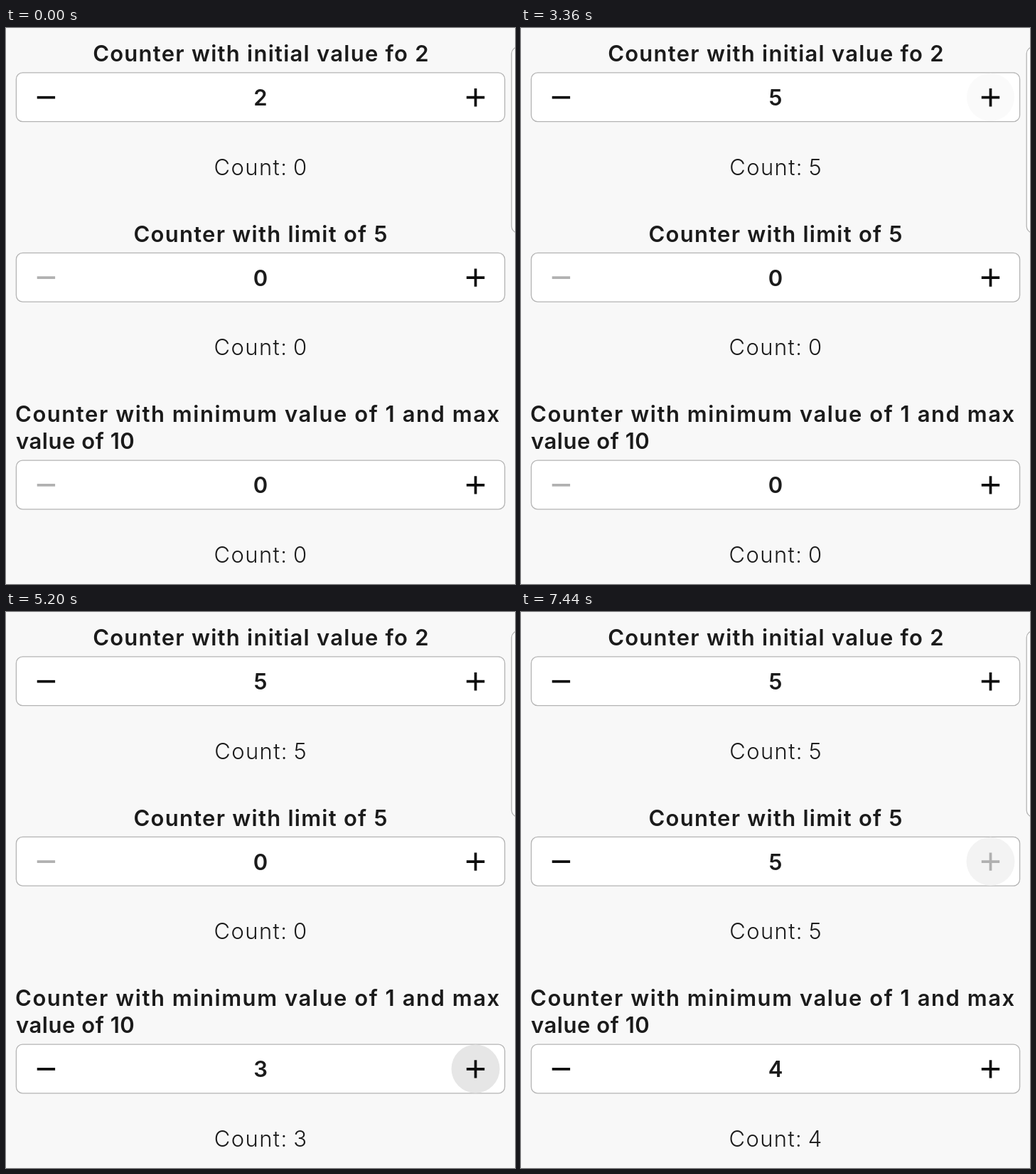
Animation, 716 px wide and 782 px high, one loop 8000 ms. Source, as an HTML page:

```html
<!DOCTYPE html>
<html lang="en">
<head>
<meta charset="utf-8">
<title>Counters</title>
<style>
  html, body { margin: 0; width: 100%; height: 100%; overflow: hidden; background: #f8f8f8; }
  svg { display: block; width: 716px; height: 782px; }
  text { font-family: Inter, "Open Sans", sans-serif; font-size: 31px; fill: #1b1b1b; }
  .title, .value { font-weight: 600; }
  .title { letter-spacing: 1.25px; }
  .wide { letter-spacing: 1.55px; }
  .tight { letter-spacing: .55px; }
  .count { font-weight: 300; letter-spacing: 1.4px; word-spacing: -2.5px; }
  .mid { text-anchor: middle; }
  .box { fill: #fff; stroke: #b4b4b4; stroke-width: 1.3; }
  .sign { stroke: #0c0c0c; stroke-width: 3.7; fill: none; }
  .sign.off { stroke: #b0b0b0; }
</style>
</head>
<body>
<svg viewBox="0 0 716 782">
  <rect class="box" x="711.2" y="27" width="40" height="261" rx="9"/>
  <text class="title mid" x="359" y="47">Counter with initial value fo 2</text>
  <text class="title mid" x="358.6" y="300.5">Counter with limit of 5</text>
  <text class="title wide" x="13" y="554">Counter with minimum value of 1 and max</text>
  <text class="title tight" x="14" y="592">value of 10</text>
  <g id="rows"></g>
</svg>
<script>
const LOOP = 8000;
const ROWS = [
  { y: 97.3, start: 2, min: 0, max: Infinity },
  { y: 350.7, start: 0, min: 0, max: 5 },
  { y: 642.5, start: 0, min: 1, max: 10 }
];
const NONE = [0, '#fff'], SMALL = [26, '#e8e8e8'], FULL = [34, '#e6e6e6'],
      SOFT = [34, '#f3f3f3'], FAINT = [33.5, '#fafafa'];

// time, row, value, ripple
const STEPS = [
  [2400, 0, 3, SMALL], [2480, 0, 3, FULL],
  [2720, 0, 4, SOFT], [2800, 0, 4, FULL],
  [3040, 0, 5, FULL], [3360, 0, 5, FAINT], [4160, 0, 5, NONE],
  [4160, 2, 1, SMALL], [4240, 2, 1, FULL],
  [4400, 2, 2, SOFT], [4480, 2, 2, SMALL], [4560, 2, 2, FULL], [4800, 2, 2, FAINT],
  [4960, 2, 3, SMALL], [5040, 2, 3, FULL],
  [5520, 2, 4, SOFT], [5600, 2, 4, FULL], [5840, 2, 4, FAINT], [6400, 2, 4, NONE],
  [6400, 1, 1, SMALL], [6480, 1, 1, FULL],
  [6960, 1, 2, FULL], [7120, 1, 3, FULL], [7280, 1, 4, FULL], [7440, 1, 5, SOFT]
];

const holder = document.getElementById('rows');
holder.innerHTML = ROWS.map(({ y }) => `
  <g transform="translate(0 ${y})">
    <rect class="box" x="14.4" y="-34.4" width="687.2" height="68.8" rx="9"/>
    <circle cx="660.5" cy="0"/>
    <path class="sign minus" d="M43.7 .4h25.4"/>
    <path class="sign plus" d="M647.8 .4h25.4M660.5 -12.3v25.4"/>
    <text class="value mid" x="358" y="11.8"></text>
    <text class="count mid" x="358.6" y="109.3"></text>
  </g>`).join('');

const views = [...holder.children].map(g => {
  const [ripple, minus, plus, value, count] = ['circle', '.minus', '.plus', '.value', '.count']
    .map(s => g.querySelector(s));
  return { ripple, minus, plus, value, count };
});

function show(i, value, [radius, color], touched) {
  const v = views[i], row = ROWS[i];
  v.value.textContent = value;
  v.count.textContent = 'Count: ' + (touched ? value : 0);
  v.ripple.setAttribute('r', radius);
  v.ripple.setAttribute('fill', color);
  v.minus.classList.toggle('off', value <= row.min);
  v.plus.classList.toggle('off', value >= row.max);
}

function draw() {
  const t = performance.now() % LOOP;
  ROWS.forEach((row, i) => {
    const step = STEPS.filter(s => s[1] === i && s[0] <= t).pop();
    if (step) show(i, step[2], step[3], true);
    else show(i, row.start, NONE, false);
  });
  requestAnimationFrame(draw);
}
draw();
</script>
</body>
</html>
```
